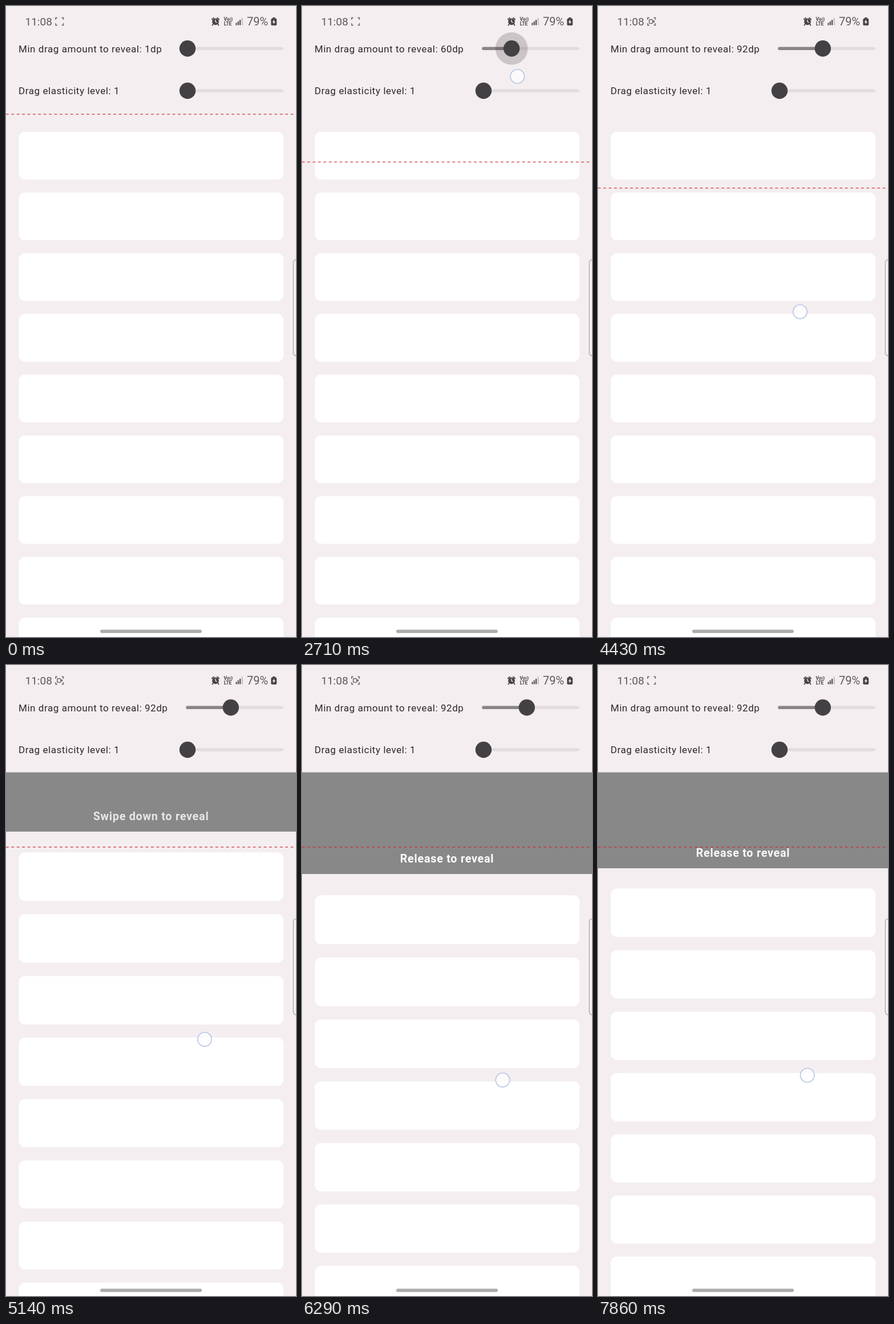
These frames come from a looping animation (508x1102 px, 8 s). An HTML page:

```html
<!DOCTYPE html>
<html lang="en">
<head>
<meta charset="utf-8">
<title>Swipe to reveal</title>
<style>
html, body { margin: 0; width: 100%; height: 100%; overflow: hidden; background: #f4eef0; }
svg { display: block; width: 100%; height: 100%; font-family: Roboto, sans-serif; }
.label { font-size: 17px; letter-spacing: .567px; fill: #2b292c; }
.hint { font-size: 19.84px; font-weight: 700; letter-spacing: .708px; fill: #fff; text-anchor: middle; }
.status { fill: #5c595c; }
.dark { fill: #474447; }
.volte { font-size: 8.4px; font-weight: 700; }
.rail { stroke-width: 5.6; stroke-linecap: round; }
</style>
</head>
<body>
<svg viewBox="0 0 508 1102" xmlns="http://www.w3.org/2000/svg">
  <rect width="508" height="1102" fill="#f4eef0"/>
  <g id="cards" fill="#fff"></g>
  <rect id="panel" y="187.5" width="508" height="0" fill="#888"/>
  <text id="hint" class="hint" x="254"></text>
  <path id="limit" d="M0 0H508" stroke="#d3262e" stroke-opacity=".8" stroke-width="1.5" stroke-dasharray="4.704"/>

  <text id="amount" class="label" x="22" y="80.5"></text>
  <text class="label" x="22" y="154">Drag elasticity level: 1</text>
  <path class="rail" d="M318 74.3H483M318 148H483" stroke="#e1dddf"/>
  <path id="active" class="rail" stroke="#888587"/>
  <circle id="halo" cy="74.3" r="28.3" fill="#2b222b" fill-opacity=".2"/>
  <circle id="thumb" cy="74.3" r="14.2" fill="#434143"/>
  <circle cx="318" cy="148" r="14.2" fill="#434143"/>

  <g class="status">
    <text x="33.5" y="34" font-size="19">11:08</text>
    <text x="422" y="34" font-size="20">79%</text>
    <path d="M90 20.5H87V24M97.500 20.500H100.500V24M90 33.500H87V30M97.500 33.500H100.500V30" fill="none" stroke="#625f62" stroke-width="1.4"/>
    <g id="camera">
      <rect x="89.800" y="23.800" width="6" height="6.600" rx="1.200" fill="none" stroke="#625f62" stroke-width="1.400"/>
      <path d="M96 27L99 24.500V29.500Z"/>
    </g>
  </g>
  <g class="dark">
    <circle cx="367" cy="27.300" r="5.900"/>
    <path d="M360.800 23.500L364 20.600M373.200 23.500L370 20.600M362.600 32L361.400 33.600M371.400 32L372.600 33.600" stroke="#474447" stroke-width="1.800" stroke-linecap="round"/>
    <path d="M367 23.800V27.600L369.600 29" fill="none" stroke="#f4eef0" stroke-width="1.300"/>
    <text class="volte" x="381.500" y="26.300">Vo</text>
    <path d="M392.500 20.500Q394 23 392.500 25.800M395 19.500Q397.200 23 395 26.800" fill="none" stroke="#474447" stroke-width="1.100"/>
    <text class="volte" x="381.700" y="34.300">LTE</text>
    <path d="M402.500 29.500h2v4h-2zM405.800 26.800h2v6.700h-2zM409.100 24h2v9.500h-2z"/>
    <path d="M412.700 20.800h2v12.700h-2z" fill="#bdb8bb"/>
    <path d="M467 20h4.500v1.800h1q1.700 0 1.700 1.700v8.800q0 1.700-1.700 1.700h-6.500q-1.700 0-1.700-1.700v-8.800q0-1.700 1.700-1.700h1z"/>
    <path d="M470.300 23.300L466.400 28.500H468.900L468.200 32.300L472.100 27.100H469.600Z" fill="#f4eef0"/>
  </g>

  <rect x="503.300" y="443.300" width="20" height="167.500" rx="5" fill="#f5f1f2" stroke="#b6b2b4" stroke-width="1.600"/>
  <rect x="165" y="1089.300" width="178" height="5.600" rx="2.800" fill="#aeabad"/>
  <circle id="touch" r="12.200" fill="#fff" fill-opacity=".72" stroke="#b8c5e6" stroke-width="1.600"/>
</svg>
<script>
const LOOP = 8000, STEP = LOOP / 56, TOP = 187.5, CARD = 83.3;
const $ = id => document.getElementById(id);
const set = (el, attrs) => { for (const k in attrs) el.setAttribute(k, attrs[k]); };
const show = (el, on) => set(el, { visibility: on ? 'visible' : 'hidden' });
const clamp = v => Math.min(1, Math.max(0, v));

// Smooth curve through [time, value] keys that never overshoots them
function track(keys) {
  const slope = i => (keys[i + 1][1] - keys[i][1]) / (keys[i + 1][0] - keys[i][0]);
  const tangent = i => {
    if (i === 0 || i === keys.length - 1) return 0;
    const a = slope(i - 1), b = slope(i);
    return a * b > 0 ? 2 * a * b / (a + b) : 0;
  };
  return t => {
    if (t <= keys[0][0]) return keys[0][1];
    const i = keys.findIndex(k => k[0] > t) - 1;
    if (i < 0) return keys[keys.length - 1][1];
    const [t0, a] = keys[i], [t1, b] = keys[i + 1], h = t1 - t0, u = (t - t0) / h;
    const e = u * u * (3 - 2 * u);
    return a + (b - a) * e + h * u * (1 - u) * ((1 - u) * tangent(i) - u * tangent(i + 1));
  };
}

const amount = track([[1000, 1], [1429, 104], [1857, 162], [2143, 183], [2714, 60], [2950, 50], [3150, 58], [3620, 92]]);
const sliderY = track([[1000, 86], [1429, 104], [2143, 116], [2714, 123], [3620, 126]]);
const pull = track([[4429, 0], [5143, 103.5], [6286, 177.5], [7100, 112], [7857, 167.5]]);
const stretch = track([[4429, 0], [5143, 1], [6286, 1.25], [7100, .6], [7857, .78]]);
const listX = track([[4429, 354], [5143, 348], [6286, 351.5], [7857, 366.7]]);
const listY = track([[4286, 526], [4429, 534], [5143, 653.7], [6286, 724.7], [7100, 662], [7857, 716.5]]);

const cards = Array.from({ length: 9 }, () => {
  const r = document.createElementNS('http://www.w3.org/2000/svg', 'rect');
  set(r, { x: 22.4, width: 463.8, rx: 11 });
  return $('cards').appendChild(r);
});

function draw(t) {
  const dp = Math.round(amount(t)), x = 318 + (dp - 1) * .833;
  $('amount').textContent = `Min drag amount to reveal: ${dp}dp`;
  set($('thumb'), { cx: x });
  set($('active'), { d: `M318 74.3H${x}` });
  show($('active'), dp > 1);
  set($('halo'), { cx: x, opacity: clamp((t - 900) / 200) * clamp((3950 - t) / 220) });
  set($('limit'), { transform: `translate(0 ${TOP + dp * 1.4175})` });

  const off = pull(t), k = stretch(t);
  const place = d => TOP + off + d + k * (3.3 + .0215 * d - .0000115 * d * d);
  cards.forEach((c, i) => {
    const d = 32.2 + 106.05 * i, y = place(d);
    set(c, { y, height: place(d + CARD) - y });
  });
  const ready = off > 130;
  set($('panel'), { height: off });
  $('hint').textContent = ready ? 'Release to reveal' : 'Swipe down to reveal';
  set($('hint'), { y: TOP + off - 20, opacity: clamp(ready ? .5 + (off - 130) / 85 : off / 130) });
  show($('hint'), off > 24);

  const sliding = t > 990 && t < 3800, dragging = t > 4280;
  show($('touch'), sliding || dragging);
  set($('touch'), dragging
    ? { cx: listX(t), cy: listY(t) }
    : { cx: 322 + (x - 318) * 1.125, cy: sliderY(t) });
  show($('camera'), t > 700 && (t - 700) % 3720 < 1950);
}

const start = performance.now();
function tick(now) {
  const t = Math.max(0, now - start) % LOOP;
  draw(Math.floor((t + 5) / STEP) % 56 * STEP);
  requestAnimationFrame(tick);
}
draw(0);
requestAnimationFrame(tick);
</script>
</body>
</html>
```
